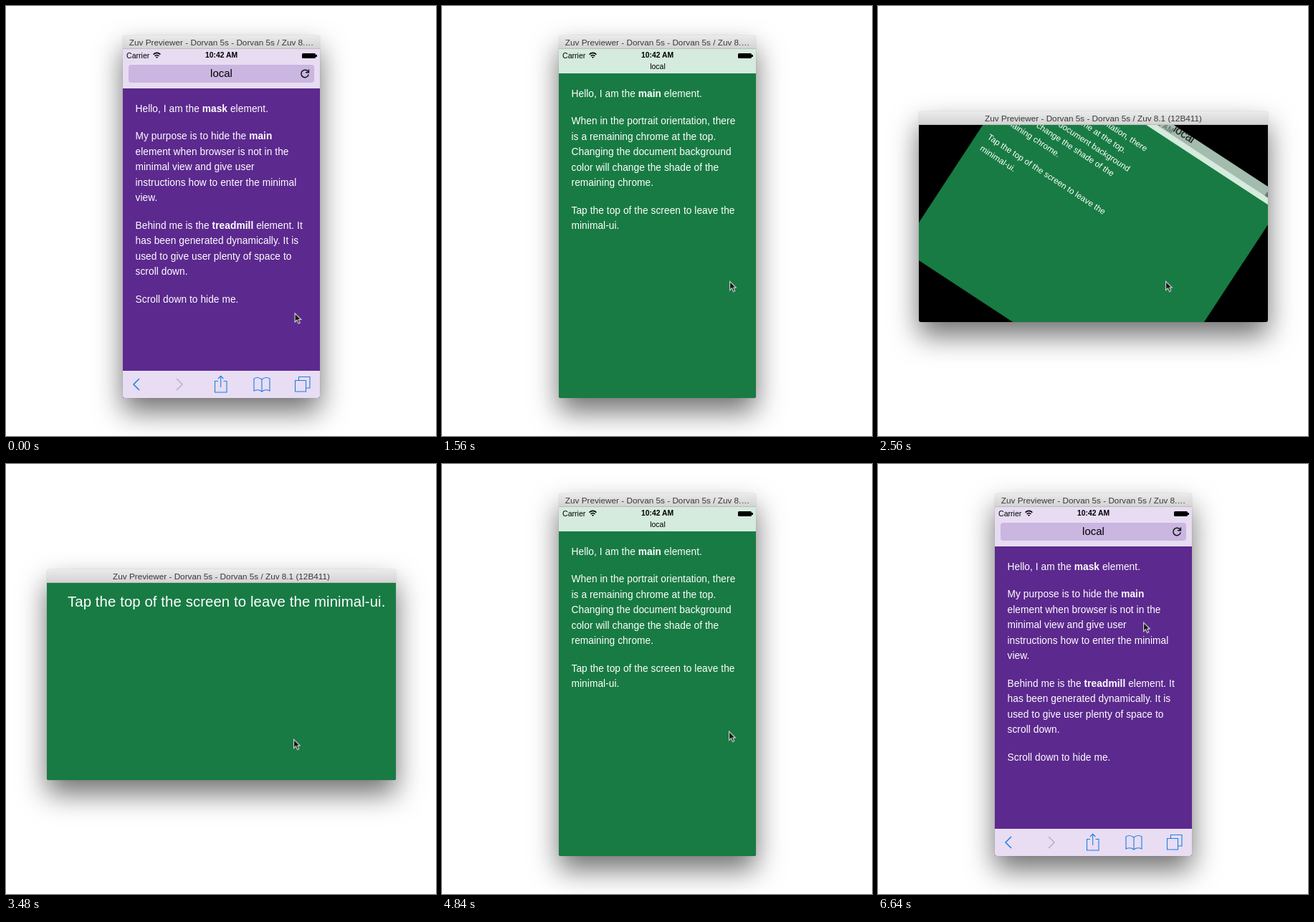
Recreate the animation shown at these times as an HTML page. Size 600 by 600 pixels, loop 6680 ms.

```html
<!DOCTYPE html>
<html lang="en">
<head>
<meta charset="utf-8">
<title>Minimal view demo</title>
<style>
/* --bars: browser bars, 0 minimal to 1 full; --land: 0 portrait to 1 landscape; --turn: page angle */
@property --bars { syntax: "<number>"; inherits: true; initial-value: 1; }
@property --land { syntax: "<number>"; inherits: true; initial-value: 0; }
@property --turn { syntax: "<angle>"; inherits: true; initial-value: 0deg; }

html, body { margin: 0; width: 100%; height: 100%; overflow: hidden; background: #fff; }
p { margin: 0 0 1.25em; white-space: nowrap; }
svg { position: absolute; fill: none; stroke: #1c7ee2; overflow: visible; }

.stage {
  position: relative; width: 600px; height: 600px; overflow: hidden; background: #fff;
  font-family: "Liberation Sans", Arial, sans-serif;
  animation: bars 6.68s linear infinite, rotate 6.68s linear infinite;
}
.stage div, .stage span { position: absolute; }

.window {
  border-radius: 4px;
  box-shadow: 0 19px 38px rgba(0, 0, 0, .56), 0 0 1px rgba(0, 0, 0, .4);
  animation: frame 6.68s step-end infinite;
}
.title {
  left: 0; right: 0; top: 0; height: 19px; border-radius: 4px 4px 0 0;
  background: linear-gradient(#ebebeb, #d2d2d2); box-shadow: inset 0 -1px #bcbcbc;
  color: #383838; font-size: 11.75px; line-height: 20px; text-align: center; white-space: nowrap;
}
.title span { left: 0; right: 0; }
.short { animation: upright 6.68s step-end infinite; }
.long { animation: sideways 6.68s step-end infinite; }
.screen { left: 0; right: 0; top: 19px; bottom: 0; overflow: hidden; background: #000; border-radius: 0 0 3px 3px; }
.page {
  --w: calc(275px + 212px * var(--land));
  --h: calc(487px - 212px * var(--land));
  left: calc((100% - var(--w)) / 2); top: calc((100% - var(--h)) / 2);
  width: var(--w); height: var(--h);
  overflow: hidden; background: #187b43;
  transform: rotate(var(--turn));
}

.text { color: #fff; font-size: 13.73px; line-height: 21.45px; letter-spacing: .06px; }
.text p { margin-bottom: 17.2px; }
.main { left: 0; top: 50%; transform-origin: 0 0; animation: main 6.68s step-end infinite;
  transform: translateY(calc(-10px * var(--land))) scale(calc(1 - .235 * var(--land))); }
.main .text { left: 17.5px; top: -191.8px; }
.wide { left: 0; right: 0; top: 50%; height: 275px; margin-top: -137.5px; overflow: hidden;
  transform-origin: 0 50%; transform: scale(calc(1.235 - .235 * var(--land)));
  animation: wide 6.68s step-end infinite; }
.wide .text { left: 29px; font-size: 20.33px; line-height: 31.75px; letter-spacing: .1px;
  animation: jump 6.68s step-end infinite; }
.wide p { margin-bottom: 25.4px; }
.mask { inset: 0; background: #5c298e; animation: mask 6.68s step-end infinite; }
.mask .text { left: 17.5px; top: calc(51.7px + 21px * var(--bars)); }

.bar {
  left: 0; right: 0; top: 0; color: #000;
  height: calc(34px + 21px * var(--bars) - 21px * var(--land));
  animation: tint 6.68s step-end infinite, bar 6.68s linear infinite;
}
.bar::before { content: ""; position: absolute; left: 0; right: 0; top: 0; height: 13px;
  background: #3c5546; opacity: calc(.5 * var(--land)); }
.field {
  left: 8px; right: 8px; top: calc(12px + 9.5px * var(--bars)); height: 25px; border-radius: 4px; background: #cab6e1;
  opacity: clamp(0, calc((var(--bars) - .4) / .6), 1);
  transform: scale(calc(.7 + .3 * var(--bars)));
}
.host {
  left: calc(50% + 60px * var(--land));
  top: calc(24px + 9.5px * var(--bars) - 33.6px * var(--land));
  font-size: 15px; line-height: 20px;
  transform: translate(-50%, -50%) scale(calc((.7 + .3 * var(--bars)) * (1 + .78 * var(--land))));
}
.status { left: 0; right: 0; top: 0; height: 18px; font-size: 10.6px; line-height: 18.5px; color: #000;
  opacity: calc(1 - var(--land)); white-space: nowrap; }
.status .clock { left: 0; right: 0; text-align: center; font-weight: bold; font-size: 10.4px; }
.battery { right: 6.5px; top: 5.5px; width: 19px; height: 7.5px; background: #000; border-radius: 1.5px; }
.battery::after { content: ""; position: absolute; left: 19.5px; top: 2.5px; width: 1.5px; height: 3px; background: #000; }
.tools { left: 0; right: 0; height: 38px; bottom: calc(38px * (var(--bars) - 1)); background: #e8ddf3;
  animation: mask 6.68s step-end infinite; }
.cursor { left: 0; top: 0; width: 12px; height: 18px; animation: move 6.68s linear infinite; }

@keyframes bars {
  0%, 3.593% { --bars: 1; animation-timing-function: ease-in-out; }
  12.575% { --bars: .12; animation-timing-function: ease-out; }
  19.16%, 88.024% { --bars: 0; animation-timing-function: ease-in-out; }
  93.413%, 100% { --bars: 1; }
}
@keyframes rotate {
  0%, 35.25% { --land: 0; --turn: 0deg; }
  35.254% { --land: 0; --turn: 90deg; animation-timing-function: ease-in-out; }
  40.6%, 55.688% { --land: 1; --turn: 0deg; }
  55.689% { --land: 1; --turn: -90deg; }
  55.93% { --land: 1; --turn: -90deg; animation-timing-function: ease-in-out; }
  61.916%, 100% { --land: 0; --turn: 0deg; }
}
@keyframes frame {
  0%, 55.689%, 100% { left: 163px; top: 41px; width: 275px; height: 506px; }
  35.254% { left: 57px; top: 147px; width: 487px; height: 294px; }
}
@keyframes upright { 0%, 55.689%, 100% { visibility: visible; } 35.254% { visibility: hidden; } }
@keyframes sideways { 0%, 55.689%, 100% { visibility: hidden; } 35.254% { visibility: visible; } }
@keyframes main { 0%, 64.072%, 100% { visibility: visible; } 43.713% { visibility: hidden; } }
@keyframes wide { 0%, 64.072%, 100% { visibility: hidden; } 43.713% { visibility: visible; } }
@keyframes jump { 0% { top: 17px; } 52.096%, 100% { top: -199px; } }
@keyframes mask { 0%, 87.425%, 100% { visibility: visible; } 12.575% { visibility: hidden; } }
@keyframes tint {
  0%, 100% { background-color: #e7dcf2; }
  12.575% { background-color: #d5ebdd; }
  87.425% { background-color: #dfd3ea; }
  97.6% { background-color: #e7dcf2; }
}
@keyframes bar { 0%, 38.6% { opacity: 1; } 40.6%, 64.07% { opacity: 0; } 64.072%, 100% { opacity: 1; } }
@keyframes move {
  0%, 3.593% { transform: translate(402.5px, 428px); animation-timing-function: ease-in-out; }
  13.17%, 71.856% { transform: translate(401px, 383.5px); animation-timing-function: cubic-bezier(.4, .2, .4, 1); }
  82.036%, 92.81% { transform: translate(373px, 80.5px); animation-timing-function: ease-in-out; }
  99.4%, 100% { transform: translate(370px, 220.5px); }
}
</style>
</head>
<body>
<div class="stage">
  <div class="window">
    <div class="title">
      <span class="short">Zuv Previewer - Dorvan 5s - Dorvan 5s / Zuv 8.…</span>
      <span class="long">Zuv Previewer - Dorvan 5s - Dorvan 5s / Zuv 8.1 (12B411)</span>
    </div>
    <div class="screen">
      <div class="page">
        <div class="main"><div class="text">
          <p>Hello, I am the <b>main</b> element.</p>
          <p>When in the portrait orientation, there<br>is a remaining chrome at the top.<br>Changing the document background<br>color will change the shade of the<br>remaining chrome.</p>
          <p>Tap the top of the screen to leave the<br>minimal-ui.</p>
        </div></div>
        <div class="wide"><div class="text">
          <p>Hello, I am the <b>main</b> element.</p>
          <p>When in the portrait orientation, there is a<br>remaining chrome at the top. Changing the<br>document background color will change the<br>shade of the remaining chrome.</p>
          <p>Tap the top of the screen to leave the minimal-ui.</p>
        </div></div>
        <div class="mask"><div class="text">
          <p>Hello, I am the <b>mask</b> element.</p>
          <p>My purpose is to hide the <b>main</b><br>element when browser is not in the<br>minimal view and give user<br>instructions how to enter the minimal<br>view.</p>
          <p>Behind me is the <b>treadmill</b> element. It<br>has been generated dynamically. It is<br>used to give user plenty of space to<br>scroll down.</p>
          <p>Scroll down to hide me.</p>
        </div></div>
        <div class="bar">
          <div class="field">
            <svg style="right:6px;top:5px" width="14" height="15" stroke-width="1.5">
              <g stroke="#111"><path d="M11.8 5.2A5.2 5.2 0 1 0 12.2 8.5"/><path d="M12.4 1.4V5.8H8" /></g>
            </svg>
          </div>
          <span class="host">local</span>
        </div>
        <div class="status">
          <span style="left:5px">Carrier</span>
          <svg style="left:42px;top:4px" width="11" height="10" stroke-width="1.6">
            <g stroke="#000"><path d="M.6 3.6Q5.5-.8 10.4 3.6M2.6 5.8Q5.5 3.2 8.4 5.8"/><path d="M4.4 7.3h2.2L5.5 8.6z" fill="#000" stroke-width=".8"/></g>
          </svg>
          <span class="clock">10:42 AM</span>
          <span class="battery"></span>
        </div>
        <div class="tools">
          <svg width="275" height="38" stroke-width="1.1">
            <path d="M23 11L15 19L23 27" stroke-width="1.5"/>
            <path d="M75 11L83 19L75 27" stroke="#b9b0c4" stroke-width="1.5"/>
            <path d="M133 14.5H128.5V30H145V14.5H140.5M136.7 23V7.5M133 11L136.7 7.3L140.4 11"/>
            <path d="M194 12Q188 7.5 183 11V28Q189 25 194 29Q199 25 205 28V11Q200 7.5 194 12V29"/>
            <path d="M240.5 13.5h15v15.5h-15zM245.5 13.5V8.5H261V24H255.5"/>
          </svg>
        </div>
      </div>
    </div>
  </div>
  <div class="cursor">
    <svg width="12" height="18">
      <path d="M.6.8V13L3.5 10.3L5.6 15L7.8 14L5.8 9.5H9.3Z" fill="#111" stroke="#d8d8d8" stroke-width="1.1"/>
    </svg>
  </div>
</div>
</body>
</html>
```
